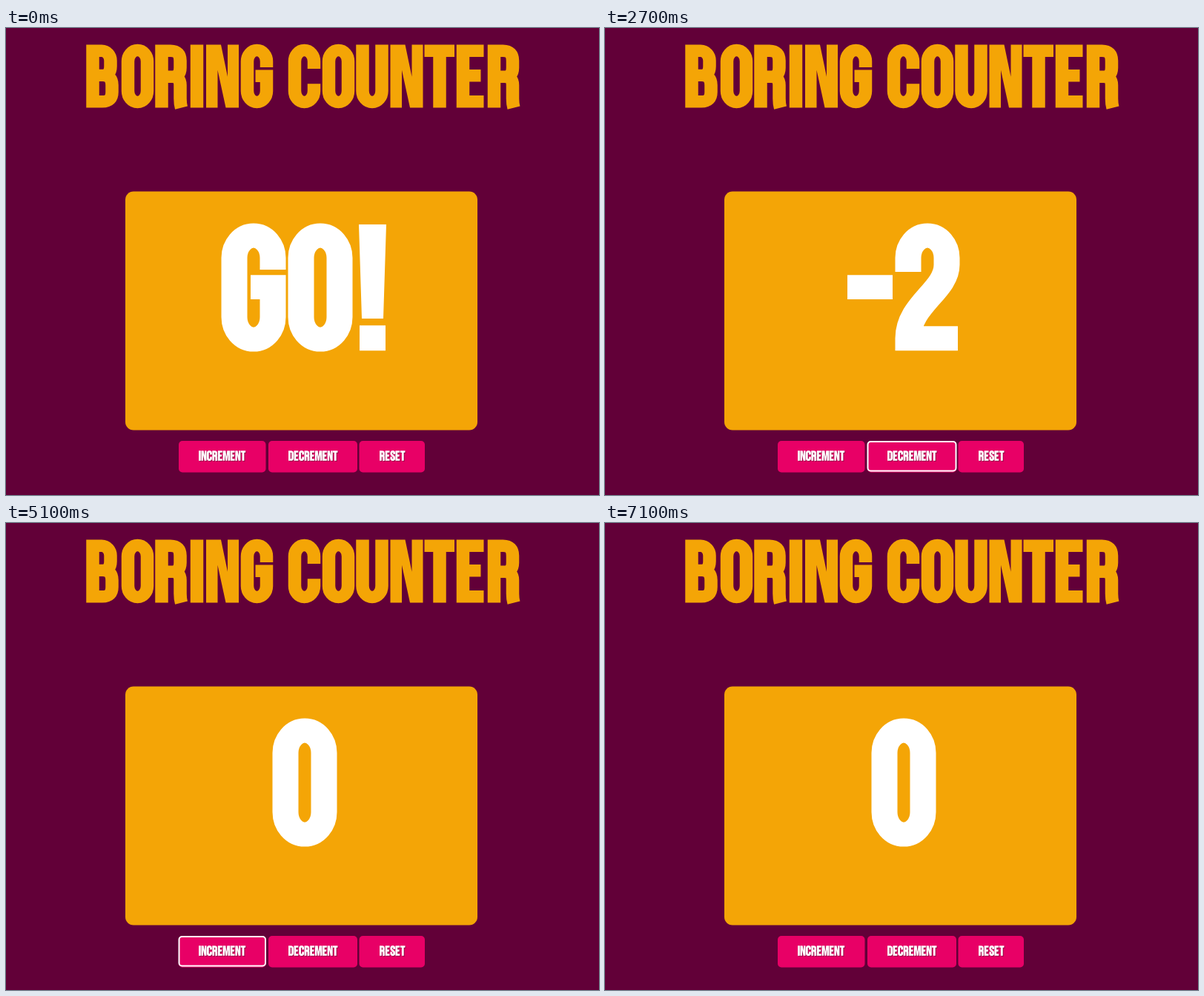
An HTML page that plays this animation: 800 px wide and 630 px high, repeating every 8.5 s.

```html
<!DOCTYPE html>
<html lang="en">
<head>
<meta charset="utf-8">
<title>Boring Counter</title>
<style>
  html, body { margin: 0; width: 100%; height: 100%; overflow: hidden; background: #620038; }
  svg { display: block; width: 800px; height: 630px; }
</style>
</head>
<body>
<svg id="stage" viewBox="0 0 800 630">
  <rect x="161" y="220.5" width="475" height="322" rx="11" fill="#f4a506"/>
  <g id="title"></g>
  <g id="count"></g>
  <g id="buttons"></g>
</svg>
<script>
const LOOP = 8500, TICK = 100;
const PINK = '#e80066', GOLD = '#f4a506';
const $ = id => document.getElementById(id);

// Condensed display lettering: [advance, stroked path, filled path]
const GLYPHS = {
  ' ': [38],
  '-': [64, 'M0 90H61'],
  '!': [48, '', 'M5 0H42L38 135H9ZM6 145H41V181H6Z'],
  0: [91, 'M18 48V133A26 32 0 0 0 70 133V48A26 32 0 0 0 18 48Z'],
  1: [91, 'M56 0V181', 'M51 0C49 17 40 21 12 21V52H40V0Z'],
  2: [91, 'M18 68V48A26 32 0 0 1 70 48V58C70 95 18 115 18 163.5H85'],
  3: [91, 'M18 60V48A26 32 0 0 1 70 48V66Q70 88 46 88H36M46 88Q70 88 70 112V133A26 32 0 0 1 18 133V116'],
  4: [91, '', 'M42 0H80V114H92V149H80V181H44V149H-5V118ZM30 114H45L48 58Z'],
  5: [91, 'M82 17.5H18V98M30 82Q36 74 46 74Q70 74 70 98V133A26 32 0 0 1 18 133V116'],
  6: [91, 'M70 53V48A26 32 0 0 0 18 48V133A26 32 0 0 0 70 133V100Q70 76 48 76Q38 76 30 84'],
  B: [95, 'M18 17.5H42A24 28 0 0 1 66 45.5V62Q66 88 44 88H18M44 88Q70 88 70 116V136Q70 163.5 44 163.5H18V0'],
  C: [92, 'M70 69V48A26 32 0 0 0 18 48V133A26 32 0 0 0 70 133V112'],
  D: [93, 'M18 17.5H42Q70 17.5 70 48V133Q70 163.5 42 163.5H18Z'],
  E: [84, 'M74 17.5H18V163.5H74M18 89H66'],
  G: [90, 'M70 65V48A26 32 0 0 0 18 48V133A26 32 0 0 0 70 133V72.5M40 90H70'],
  I: [43, 'M18 0V181'],
  M: [126, '', 'M0 0H48L60 118L72 0H120V181H87V60L72 181H47L32 62V181H0Z'],
  N: [93, '', 'M0 0H40L58 92V0H88V181H53L31 73V181H0Z'],
  O: [91, 'M18 48V133A26 32 0 0 0 70 133V48A26 32 0 0 0 18 48Z'],
  R: [95, 'M18 181V17.5H42Q68 17.5 68 46V66Q68 92 46 92H18M46 92Q68 92 68 116V155Q68 170 71 181'],
  S: [88, 'M68 64V48A25 32 0 0 0 18 48V58C18 92 68 86 68 128V133A25 32 0 0 1 18 133V112'],
  T: [85, 'M-1 17.5H80M40 0V181'],
  U: [93, 'M18 0V133A26 32 0 0 0 70 133V0'],
};

const widthOf = text => [...text].reduce((sum, ch) => sum + GLYPHS[ch][0], 0);

function lettering(text, x, y, size, color) {
  let pen = 0, shapes = '';
  for (const ch of text) {
    const [advance, stroke = '', fill = ''] = GLYPHS[ch];
    shapes += `<g transform="translate(${pen})">` +
      `<path d="${stroke}" fill="none" stroke="${color}" stroke-width="35"/>` +
      `<path d="${fill}" fill="${color}" fill-rule="evenodd"/></g>`;
    pen += advance;
  }
  return `<g role="img" aria-label="${text}" transform="translate(${x} ${y}) scale(${size} ${size * 0.94})">${shapes}</g>`;
}

const BUTTONS = [
  { label: 'INCREMENT', x: 233, w: 117.5, textX: 260 },
  { label: 'DECREMENT', x: 354, w: 120, textX: 381 },
  { label: 'RESET', x: 476.5, w: 88.5, textX: 504 },
];
const INC = 0, DEC = 1, RESET = 2, NONE = -1;

// [start time, value]
const COUNTS = [
  [0, 'GO!'], [600, '-1'], [800, '-2'], [1000, '-3'], [1200, '-4'], [1900, '-3'], [2100, '-2'],
  [2800, '-3'], [2900, '-4'], [3200, '-5'], [3400, '-6'], [4200, '0'],
  [5200, '1'], [5300, '2'], [5900, '1'], [6400, '0'],
];
const HOVERS = [
  [0, NONE], [400, DEC], [1600, INC], [2500, DEC], [3900, RESET], [4500, DEC],
  [4900, INC], [5600, DEC], [6200, RESET], [6500, DEC], [6900, NONE],
];
const indexAt = (track, t) => track.findLastIndex(([start]) => start <= t);

$('title').innerHTML = lettering('BORING COUNTER', 108, 22.5, 0.5, GOLD);
$('buttons').innerHTML = BUTTONS.map(({ label, x, w, textX }) => `
  <rect x="${x}" y="557" width="${w}" height="42.5" rx="5" fill="${PINK}"/>
  <rect class="ring" x="${x + 0.5}" y="558" width="${w - 1}" height="39.5" rx="4" fill="none" stroke="#fff" stroke-width="2"/>
  <g opacity=".45">${lettering(label, textX + 1, 571.2, 0.08, '#300018')}</g>
  ${lettering(label, textX, 570.2, 0.08, '#fff')}`).join('');
const rings = document.querySelectorAll('.ring');

let shown;
function showCount(text) {
  if (text === shown) return;
  shown = text;
  $('count').innerHTML = lettering(text, 404.5 - widthOf(text) / 2, 265, 1, '#fff');
}

function draw(now) {
  const t = Math.floor((now % LOOP) / TICK) * TICK;
  showCount(COUNTS[indexAt(COUNTS, t)][1]);

  const i = indexAt(HOVERS, t);
  const [start, current] = HOVERS[i];
  const previous = i ? HOVERS[i - 1][1] : NONE;
  const fade = Math.min(1, (t - start + TICK) / 300);
  rings.forEach((ring, n) => {
    ring.style.opacity = n === current ? fade : n === previous ? 1 - fade : 0;
  });
}

function frame() {
  draw(performance.now());
  requestAnimationFrame(frame);
}
draw(0);
requestAnimationFrame(frame);
</script>
</body>
</html>
```
